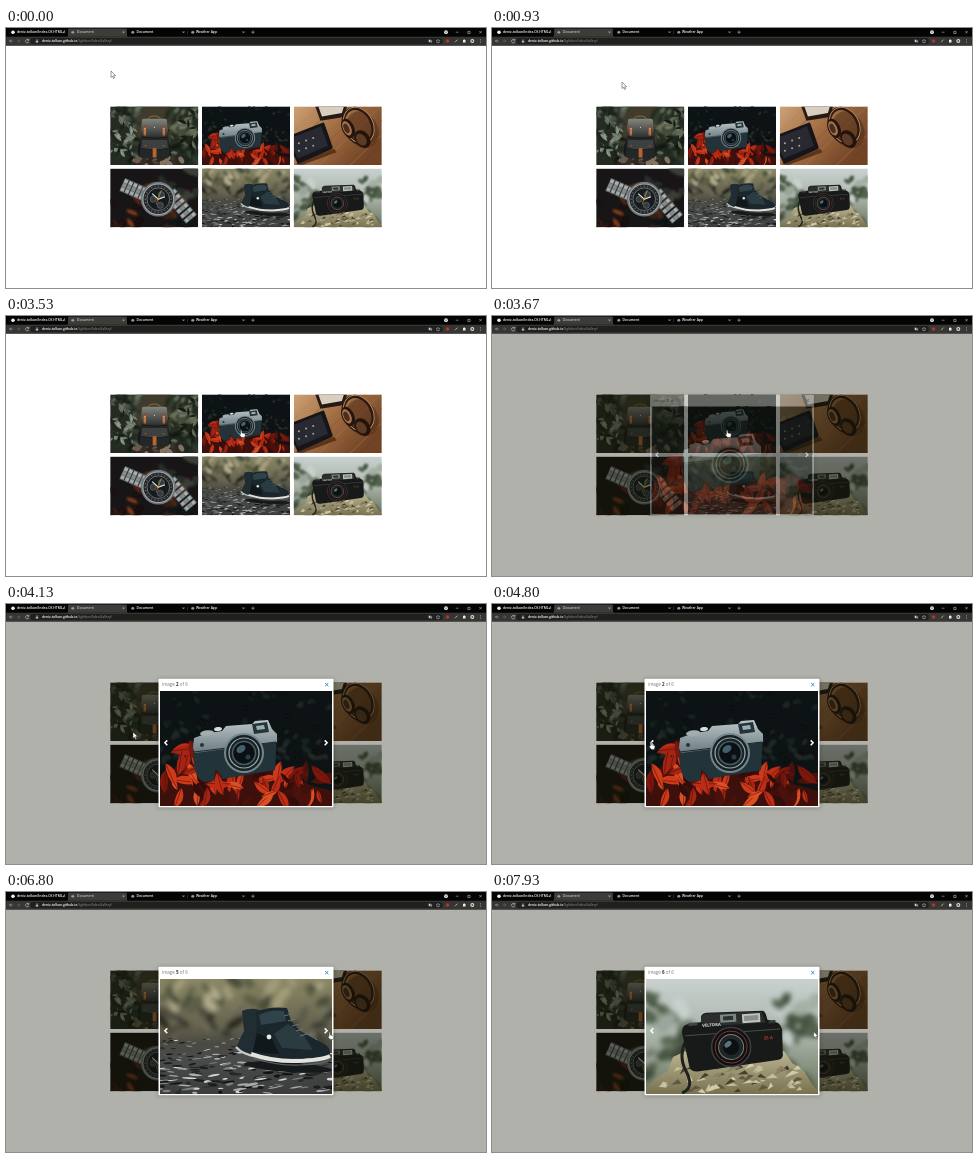
An HTML page that plays this animation: 480 px wide and 260 px high, repeating every 8 s.

```html
<!DOCTYPE html>
<html lang="en">
<head>
<meta charset="utf-8">
<title>Image gallery</title>
<style>
html, body { margin: 0; width: 100%; height: 100%; overflow: hidden; background: #fff; }
svg#stage { display: block; width: 100vw; height: 100vh; }
text { font-family: "Open Sans", Roboto, sans-serif; }
</style>
</head>
<body>
<svg id="stage" viewBox="0 0 480 260" xmlns="http://www.w3.org/2000/svg">
<defs>
  <filter id="soft" x="-20%" y="-20%" width="140%" height="140%"><feGaussianBlur stdDeviation="2.4"/></filter>
  <filter id="hazy" x="-20%" y="-20%" width="140%" height="140%"><feGaussianBlur stdDeviation="0.8"/></filter>
  <filter id="glow" x="-20%" y="-20%" width="140%" height="140%"><feGaussianBlur stdDeviation="2"/></filter>
  <linearGradient id="flap" x2="0" y2="1"><stop stop-color="#83857e"/><stop offset=".45" stop-color="#5b5d59"/><stop offset="1" stop-color="#2b2e2d"/></linearGradient>
  <linearGradient id="silver" x2="0" y2="1"><stop stop-color="#bcc7c9"/><stop offset="1" stop-color="#6b7b80"/></linearGradient>
  <linearGradient id="wood" x2="1" y2=".6"><stop stop-color="#cda277"/><stop offset=".45" stop-color="#a67146"/><stop offset="1" stop-color="#704325"/></linearGradient>
  <linearGradient id="bank" x2="0" y2="1"><stop stop-color="#8b8867"/><stop offset=".4" stop-color="#66644e"/><stop offset=".56" stop-color="#4a4a43"/><stop offset=".7" stop-color="#4a4c4b"/><stop offset="1" stop-color="#3b3d3d"/></linearGradient>
  <linearGradient id="sky" x2="0" y2="1"><stop stop-color="#c9d1d0"/><stop offset=".5" stop-color="#a9b3a8"/><stop offset="1" stop-color="#6a755e"/></linearGradient>
  <linearGradient id="log" x2="0" y2="1"><stop stop-color="#bdb693"/><stop offset="1" stop-color="#777150"/></linearGradient>
</defs>
<rect width="480" height="260" fill="#fff"/>
<g id="grid"></g>
<rect id="shade" y="17.5" width="480" height="243" fill="#1a1c08" opacity=".34"/>
<g id="box">
  <rect x="152" y="75" width="176" height="129" fill="#000" opacity=".25" filter="url(#glow)"/>
  <rect x="152.5" y="74.7" width="175" height="128.6" rx="1" fill="#fff"/>
  <text x="156" y="82.3" font-size="4.5" fill="#777">image <tspan id="count" font-weight="700" fill="#333">2</tspan> of 6</text>
  <path d="M319.2 79l3.2 3.2m0-3.2l-3.2 3.2" stroke="#2a86a4" stroke-width=".9"/>
  <use id="photo" x="154" y="87" width="172" height="115"/>
  <g fill="none" stroke="#fff" stroke-width="1.5">
    <path id="prev" d="M161.3 136.4l-2.4 2.4 2.4 2.4"/>
    <path id="next" d="M318.7 136.4l2.4 2.4-2.4 2.4"/>
  </g>
</g>
<g id="chrome"></g>
<g id="cursor" stroke="#222" stroke-width=".45" fill="#fff" stroke-linejoin="round">
  <path id="arrow" d="M0 0V6.4L1.5 5.1 2.5 7.4 3.6 6.9 2.6 4.7 4.6 4.6Z"/>
  <path id="hand" d="M.6 .3Q1.2 -.2 1.6 .5L2 3 4.7 3.6Q5.4 4 5.2 5L4.6 7.6H1.7L-.6 5.1Q-.6 4.1 .5 4.4Z"/>
</g>
</svg>
<script>
const $ = id => document.getElementById(id);
const W = 172, H = 115;

let seed = 7;
const rnd = (a = 1, b = 0) => {
  seed = (seed * 16807) % 2147483647;
  return b + (a - b) * seed / 2147483647;
};
const pick = list => list[Math.floor(rnd(list.length))];
const rect = (x, y, w, h, fill, more = '') => `<rect x="${x}" y="${y}" width="${w}" height="${h}" fill="${fill}" ${more}/>`;
const path = (d, fill, more = '') => `<path d="${d}" fill="${fill}" ${more}/>`;
const line = (d, stroke, width = 1) => `<path d="${d}" fill="none" stroke="${stroke}" stroke-width="${width}"/>`;
const disc = (x, y, r, fill, more = '') => `<circle cx="${x}" cy="${y}" r="${r}" fill="${fill}" ${more}/>`;
const oval = (x, y, rx, ry, fill, turn = 0, more = '') =>
  `<ellipse cx="${x}" cy="${y}" rx="${rx}" ry="${ry}" fill="${fill}" transform="rotate(${turn} ${x} ${y})" ${more}/>`;
const group = (filter, body) => `<g filter="url(#${filter})">${body}</g>`;

// scattered ovals inside a region
function scatter(n, [x0, y0, x1, y1], size, flat, colors) {
  let s = '';
  for (let i = 0; i < n; i++) {
    const r = rnd(size, size * .4);
    s += oval(rnd(x1, x0).toFixed(1), rnd(y1, y0).toFixed(1), r.toFixed(1), (r * flat).toFixed(1),
      pick(colors), Math.round(rnd(70, -70)));
  }
  return s;
}
// pointed leaves with a vein
function leaves(n, [x0, y0, x1, y1], size, colors, vein = '#4a0d06') {
  let s = '';
  for (let i = 0; i < n; i++) {
    const k = rnd(size, size * .5).toFixed(1), h = (k * .45).toFixed(1);
    s += `<g transform="translate(${rnd(x1, x0).toFixed(1)} ${rnd(y1, y0).toFixed(1)}) rotate(${Math.round(rnd(360))})">` +
      path(`M-${k} 0Q0 -${h * 2} ${k} 0Q0 ${h} -${k} 0Z`, pick(colors)) + line(`M-${k} 0H${k}`, vein, .5) + '</g>';
  }
  return s;
}

function backpack() {
  const dark = ['#1a211b', '#242d24', '#10160f', '#323d30'];
  let s = rect(0, 0, W, H, '#252b23');
  s += group('soft',
    rect(50, 0, 70, 70, '#3f3a2c') +
    scatter(40, [0, 0, 60, 115], 13, .4, [...dark, '#4d584a', '#66705f']) +
    scatter(32, [112, 0, 172, 115], 13, .4, [...dark, '#465039']) +
    scatter(12, [120, 5, 165, 50], 10, .4, ['#717762', '#5c654e', '#838873']));
  s += group('hazy',
    leaves(26, [2, 45, 48, 98], 11, ['#939b8b', '#7b8677', '#59675a', '#1a211b'], '#3a443a') +
    leaves(10, [0, 5, 35, 40], 11, ['#6d7868', '#4b574a', '#192019'], '#2c352c') +
    leaves(26, [118, 10, 170, 108], 11, ['#515d46', '#394433', '#151b15', '#68705a'], '#20291f'));
  s += rect(40, 104, 100, 11, '#2b2620');
  s += scatter(22, [50, 102, 145, 115], 9, .6, ['#6b594b', '#4e4037', '#352d27', '#857261']);
  s += line('M73 26Q75 19 86 19T99 26', '#8c774a', 1.8);
  s += path('M61 62L54 78 55 96 62 99ZM111 62L118 80 118 96 112 99Z', '#15191a');
  s += path('M61 40L62 26H111L113 42 116 96Q115 102 108 102H67Q58 101 58 96Z', '#232727');
  s += path('M60 46L62 27Q62 24 66 24H107Q111 24 111 27L113 46 111 59Q86 64 62 59Z', 'url(#flap)');
  s += path('M62 66H111L113 82Q87 88 61 82Z', '#3c403e') + line('M61 82Q87 88 113 82M62 60Q86 65 111 60', '#0f1211', 1.2);
  for (const x of [65.5, 102.5]) {
    s += rect(x, 38, 4.6, 20, '#8d4a28') + rect(x, 44, 4.6, 11, '#cc7340') + rect(x + .4, 42, 3.8, 2, '#cbb294');
  }
  s += disc(69, 77, 1.4, '#b75c2b') + disc(105, 77, 1.4, '#b75c2b') + rect(83, 82, 7.5, 18, '#bb6234');
  return s + disc(86.5, 41, 1.2, '#d5d6d0');
}

function redCamera() {
  const reds = ['#a52413', '#cf3a1b', '#dc4f25', '#7c170e', '#4a120d', '#2f0d0a', '#bc2c17'];
  let s = rect(0, 0, W, H, '#0d1314');
  s += group('hazy', scatter(90, [0, 0, 172, 80], 5, .5, ['#16211f', '#1d2826', '#0a0f11', '#272c26']));
  s += path('M0 95L18 72 28 50 40 60 48 84 110 76 150 94 172 100V115H0Z', '#3d100c');
  s += leaves(38, [5, 80, 165, 112], 14, reds) + leaves(10, [18, 53, 42, 85], 14, reds);
  s += path('M33 54L117 43 115 79 44 91Q36 88 34 75Z', '#22343a');
  s += path('M33 57L34 47 48 42 62 40 66 35 92 33 95 30 108 29 112 38 117 43V51L35 62Z', 'url(#silver)');
  s += path('M92 33L107 31 109 41 94 43Z', '#26343a') + path('M96 35L104 34 105 38 97 39Z', '#95afb3');
  s += oval(47, 42, 7, 2.7, '#a1aeb0', -8) + oval(58, 38, 4, 2, '#d7dddd', -8) + disc(42, 54, 2, '#263338');
  s += line('M34 61L116 51', '#1a272b', 1);
  s += disc(84, 62, 20, '#75868b') + disc(84, 62, 18, '#172226') + disc(84, 62, 15, 'none', 'stroke="#9ba9aa" stroke-width="1.2"');
  s += disc(84, 62, 11.5, '#0a1013', 'stroke="#4a5c61" stroke-width="1.5"') + oval(81, 58, 5, 3.5, '#426068', -35) + disc(88, 66, 2.5, '#263d45');
  return s + leaves(14, [20, 88, 125, 113], 13, reds) + leaves(5, [118, 77, 142, 92], 10, reds);
}

function headphones() {
  let s = rect(0, 0, W, H, 'url(#wood)');
  for (let i = 0; i < 8; i++) s += line(`M${i * 30 - 70} 115L${i * 30 + 50} 0`, i % 2 ? '#7d4f2c' : '#b27e50', 1);
  s += path('M42 0H104L98 21 52 28Z', '#261a14') + path('M48 0H98L94 13 55 20Z', '#d8cfc0');
  s += path('M3 113L79 83 84 90 16 115Z', '#5c3518');
  s += path('M0 54L56 32Q59 31 60 34L76 80Q76 83 74 84L8 113 0 96Z', '#15151a') + path('M0 60L53 39 67 77 8 102 0 86Z', '#292a31');
  for (let i = 0; i < 6; i++) s += disc(10 + i % 3 * 14, 72 - i % 3 * 5 + (i > 2 ? 15 : 0), 2, '#a5a29c');
  s += oval(134, 46, 30, 38, '#4a2915', -28, 'opacity=".5"');
  s += oval(126, 38, 27, 36, 'none', -28, 'stroke="#2c1910" stroke-width="7"');
  s += oval(127, 37, 28, 37, 'none', -28, 'stroke="#b58a63" stroke-width="2"');
  s += oval(106, 43, 12, 20, '#24140d', -24) + oval(104, 43, 8, 15, '#a2754f', -24) + oval(103, 43, 5, 10, '#4c2c1b', -24);
  return s + oval(134, 64, 14, 19, '#22130c', -38) + oval(132, 65, 9, 13, '#5d3a24', -38);
}

function watch() {
  let s = rect(0, 0, W, H, '#171516');
  s += group('soft', scatter(14, [0, 55, 60, 115], 16, .3, ['#5a2516', '#86401f', '#1f100d', '#3a1a13', '#120d0c']) +
    scatter(16, [60, 0, 172, 60], 22, .4, ['#292d2c', '#3b3d38', '#171819', '#553a28']) +
    scatter(9, [110, 60, 172, 115], 18, .4, ['#111214', '#302019', '#51281a']));
  const links = (x, y, dx, dy, turn) => {
    let r = '';
    for (let i = 0; i < 6; i++) {
      r += `<g transform="translate(${x + dx * i} ${y + dy * i}) rotate(${turn})">` +
        rect(-5, -14, 9, 28, '#5c6163') + rect(-4, -12, 7, 7, '#a9afaf') + rect(-4, -4, 7, 8, '#858c8e') + rect(-4, 5, 7, 7, '#a1a7a6') + '</g>';
    }
    return r;
  };
  s += links(28, 33, 9, 4, 24) + links(119, 51, 7.5, 9, 50);
  s += disc(94, 60, 34, '#6f7679') + disc(94, 60, 31, '#a3a9a9') + disc(94, 60, 29, '#25292c') + disc(94, 60, 22, '#161b1e', 'stroke="#aaaead" stroke-width="1"');
  for (let i = 0; i < 24; i++) {
    const a = i * Math.PI / 12, c = Math.cos(a), n = Math.sin(a);
    s += line(`M${94 + 24 * c} ${60 + 24 * n}L${94 + 27 * c} ${60 + 27 * n}`, '#c9cbc7', .8);
  }
  for (const [x, y] of [[84, 60], [100, 51], [98, 72]]) s += disc(x, y, 6, '#343b3f', 'stroke="#8d9394" stroke-width=".8"');
  return s + line('M94 60L82 49M94 60L107 55', '#ecebe5', 2) + line('M90 70L100 42', '#e1a62d', 1.2) + disc(94, 60, 1.8, '#d8aa44');
}

function shoes() {
  let s = rect(0, 0, W, H, 'url(#bank)');
  s += group('soft', scatter(40, [0, 0, 172, 32], 12, .5, ['#a19c78', '#7f7f5c', '#5c5f46', '#b0ab8b', '#494d3a']) +
    scatter(18, [0, 34, 80, 56], 13, .35, ['#37352c', '#504c3f', '#25261f', '#6b6757']) +
    scatter(10, [125, 30, 172, 60], 11, .4, ['#5b5c4c', '#3b3e35', '#787866']));
  for (let i = 0; i < 230; i++) {
    const y = rnd(114, 58), near = (y - 40) / 70;
    s += oval(rnd(172).toFixed(1), y.toFixed(1), rnd(9 * near, 2).toFixed(1), rnd(1.7 * near, .4).toFixed(1),
      pick(['#a9acac', '#1b1d1d', '#7c8080', '#d3d6d5', '#262929', '#111313']), Math.round(rnd(8, -14)));
  }
  s += oval(128, 88, 44, 5, '#171a1b', 4);
  s += path('M82 32Q90 28 100 31L110 50 110 72 92 77Q80 74 76 68Q80 60 84 52Z', '#202d33') + line('M76 68Q83 76 96 77', '#c7cac6', 2.4);
  s += path('M96 33Q108 27 127 29L131 42 140 52Q153 59 166 66Q172 71 169 78L126 80 91 75Q99 58 96 33Z', '#1a272d');
  s += path('M99 36Q111 30 124 32L126 42 101 46Z', '#30424a') + path('M128 45L143 55 153 71 122 69 114 55Z', '#2a3b42') + path('M97 54L112 60 119 75 93 73Z', '#12171a');
  s += line('M91 75Q114 83 138 82T170 77', '#e2e3dd', 4) + line('M93 79Q117 87 140 86T169 81', '#5f6667', 1.2);
  for (let i = 0; i < 5; i++) s += line(`M${124 + i * 4} ${37 + i * 5}l7 -2`, '#63757b', 1);
  return s + disc(109, 58, 2.4, '#e7e9e5');
}

function filmCamera() {
  let s = rect(0, 0, W, H, 'url(#sky)');
  s += group('soft', scatter(22, [0, 12, 42, 90], 12, .6, ['#6f7d6a', '#9aa69b', '#56654f', '#c7d0cc', '#465541']) +
    scatter(26, [128, 18, 172, 75], 11, .6, ['#77856f', '#a5b0a5', '#53634d', '#44533f', '#c3cbc6']) +
    scatter(24, [0, 72, 172, 115], 15, .5, ['#5a644c', '#717a5b', '#3d4938']));
  s += path('M0 110L10 99 22 92 27 78 40 72 52 85 70 90 100 86 128 74 138 72 146 84 158 92 166 105 172 112V115H0Z', 'url(#log)');
  for (let i = 0; i < 60; i++) {
    const x = rnd(150, 12), y = rnd(114, 90);
    s += path(`M${x.toFixed(1)} ${y.toFixed(1)}l${rnd(8, 3).toFixed(1)} ${rnd(-3, -8).toFixed(1)} ${rnd(7, 2).toFixed(1)} ${rnd(5, 1).toFixed(1)}Z`,
      pick(['#463f2e', '#d2cba9', '#8a8260', '#5f573f', '#c5be9c']));
  }
  s += line('M42 58Q31 75 40 92T36 114', '#1f211e', 3);
  let c = path('M37 50Q37 43 44 42L57 41V36Q58 32 63 32L119 34Q122 35 123 43L133 47Q136 49 137 54L136 80Q135 84 130 84L50 90Q43 90 42 85Z', '#181a1a');
  c += path('M57 37Q58 33 63 33L118 35 121 46 57 46Z', '#2b2e2d') + rect(76, 35, 16, 8, '#7e8782') + rect(79, 37, 10, 4, '#2c3333') + rect(98, 36, 18, 9, '#bfc4bb') + rect(100, 38, 14, 5, '#878f8a');
  c += `<text x="57.5" y="46" font-size="4.2" font-weight="700" fill="#d5d8d2">VELTORA</text>`;
  c += rect(40, 53, 95, 1, '#454b48') + rect(44, 41, 9, 3, '#424744') + rect(124, 44, 7, 3, '#343837');
  c += disc(85, 68, 19.5, '#0e1011', 'stroke="#3a3e3c" stroke-width="1.5"') + disc(85, 68, 16, 'none', 'stroke="#8c3a30" stroke-width=".9"');
  c += disc(85, 68, 12.5, '#202525', 'stroke="#767c78" stroke-width="1"') + disc(85, 68, 8, '#0b1013') + oval(82, 65, 4, 2.6, '#58717a', -35);
  c += `<text x="118" y="63" font-size="4.5" font-weight="700" fill="#a53c30">35 A</text>`;
  return s + `<g transform="rotate(-4 86 66)">${c}</g>`;
}

const defs = document.querySelector('defs');
const photos = [backpack, redCamera, headphones, watch, shoes, filmCamera];
defs.innerHTML += photos.map((draw, i) =>
  `<symbol id="p${i + 1}" viewBox="0 0 ${W} ${H}" preserveAspectRatio="none">${draw()}</symbol>`).join('');
$('grid').innerHTML = photos.map((_, i) =>
  `<use href="#p${i + 1}" x="${104.2 + i % 3 * 91.8}" y="${i < 3 ? 78.4 : 140.6}" width="88" height="58.7"/>`).join('');

function chrome() {
  const label = (x, y, t, fill = '#fff') => `<text x="${x}" y="${y}" font-size="3.35" font-weight="600" fill="${fill}">${t}</text>`;
  const cross = (x, y, r = .9) => line(`M${x - r} ${y - r}l${2 * r} ${2 * r}m0 ${-2 * r}l${-2 * r} ${2 * r}`, '#dcdcdc', .5);
  let s = rect(0, 0, 480, 17.6, '#040404') + rect(0, 8.7, 480, 8.9, '#363633') + rect(0, 17.2, 480, .5, '#6b5e68');
  s += path('M61 8.8Q62 8.5 62 7V1.8Q62 .6 63.5 .6H119.5Q121 .6 121 2V7Q121 8.5 122 8.8Z', '#3c3c39');
  s += rect(24, 10, 413, 6.2, '#20201f', 'rx="3.1"');
  s += disc(7, 4.2, 1.8, '#f1f1f1') + label(11, 5.4, 'deniz-tolkan/Index-Of-HTML-/');
  for (const x of [65.8, 125.8, 185.8]) s += disc(x + 1, 4.2, 1.5, '#777b80') + line(`M${x - .3} 4.2h2.6`, '#d7d9dc', .5);
  s += label(71, 5.4, 'Document', '#c9c9c5') + label(130.5, 5.4, 'Document') + label(190, 5.4, 'Weather App');
  for (const x of [58, 117.5, 177.5, 237.5]) s += cross(x, 4.2);
  s += line('M181.5 2.5V6.7', '#56585c', .4) + line('M247 2.5V5.9M245.3 4.2H248.7', '#d9dbde', .5);
  s += disc(440, 4.2, 1.9, '#eee') + path('M439.1 3.7H440.9L440 4.9Z', '#222');
  s += line('M449.8 4.2H452.5', '#ddd', .5) + line('M461.8 3.3H464V5.5H461.8Z', '#ddd', .5) + cross(474.5, 4.2, 1.2);
  s += line('M6.8 13H3.5M5 11.5L3.5 13 5 14.5', '#c6c8cb', .5) + line('M10.7 13H14M12.5 11.5L14 13 12.5 14.5', '#73767a', .5);
  s += line('M22.5 12A1.7 1.7 0 1 0 22.9 13.5M22.8 11V12.3H21.5', '#e0e2e4', .55);
  s += rect(29.8, 12.7, 2.4, 1.9, '#b9bcc0') + line('M30.3 12.7V11.8Q31 10.8 31.7 11.8V12.7', '#b9bcc0', .4);
  s += label(36, 14.2, 'deniz-tolkan.github.io<tspan font-weight="400" fill="#8f9090">/lightboxVideoGallery/</tspan>');
  s += rect(422.7, 11.7, 1.8, 2.4, '#cfd2d5') + rect(424.3, 12.2, 1.8, 2.4, '#85898e');
  s += line('M432 11.2l.6 1.3 1.3.2-1 .9.3 1.4-1.2-.7-1.2.7.3-1.4-1-.9 1.3-.2Z', '#cfd2d5', .4);
  s += disc(441.5, 13, 1.8, '#b8322c') + line('M449 14.2L451.5 11.7', '#c6cccc', .8) + rect(457, 12, 2.5, 2.5, '#eee') + disc(458.2, 11.8, .6, '#eee');
  s += disc(466.3, 13, 2, '#e0e0de') + disc(466.3, 13, 1, '#55585b');
  for (const y of [11.6, 13, 14.4]) s += disc(474.5, y, .4, '#dfe1e3');
  return s;
}
$('chrome').innerHTML = chrome();

const LOOP = 8000, OPEN = 3630;
// time, x, y of the pointer
const moves = [
  [0, 105, 43], [70, 105, 43], [600, 130, 54], [930, 130, 54], [1000, 185, 170], [1060, 236, 246],
  [1130, 240, 234], [1330, 240, 234], [1930, 155, 113], [2070, 155, 113], [2870, 210, 112],
  [2930, 210, 112], [3500, 234, 114], [3720, 234, 114], [4100, 127, 128], [4200, 127, 128],
  [4470, 150, 137], [4670, 150, 137], [4850, 159.5, 138], [5100, 159.5, 138], [5720, 323.5, 140],
  [6900, 322.5, 140], [8000, 321.5, 139.5]
];
// time, number of the photo shown from then on
const steps = [[0, 2], [5000, 1], [5930, 2], [6070, 3], [6330, 4], [6800, 5], [7270, 6]];

const clamp = v => Math.min(1, Math.max(0, v));
const smooth = v => v * v * (3 - 2 * v);

function pointer(t) {
  const i = Math.max(1, moves.findIndex(m => m[0] > t));
  const [a, x, y] = moves[i - 1], [b, u, v] = moves[i];
  const k = smooth(clamp((t - a) / (b - a)));
  return [x + (u - x) * k, y + (v - y) * k];
}
function overPhoto(x, y) {
  return x > 104 && x < 376 && (x - 104.2) % 91.8 < 88 && (y > 78.4 && y < 137 || y > 140.6 && y < 199);
}
const show = (id, on) => $(id).setAttribute('visibility', on ? 'visible' : 'hidden');

let shown = 0;
function render(t) {
  const open = t >= OPEN;
  const n = steps.filter(s => s[0] <= t).pop()[1];
  if (n !== shown) {
    shown = n;
    $('photo').setAttribute('href', '#p' + n);
    $('count').textContent = n;
  }
  show('shade', open);
  show('box', open);
  $('grid').style.filter = open ? 'brightness(.75)' : 'none';
  const k = 1 - (1 - clamp((t - OPEN) / 300)) ** 3, z = .9 + .1 * k;
  $('box').setAttribute('opacity', k);
  $('box').setAttribute('transform', `translate(240 139) scale(${z}) translate(-240 -139)`);
  $('prev').setAttribute('opacity', n > 1 ? 1 : 0);
  $('next').setAttribute('opacity', n < 6 ? 1 : 0);

  const [x, y] = pointer(t);
  const onPrev = n > 1 && x > 154 && x < 166, onNext = n < 6 && x > 314 && x < 326;
  const hand = open ? onPrev || onNext || t < 3720 : overPhoto(x, y);
  $('cursor').setAttribute('transform', `translate(${x} ${y})`);
  show('hand', hand);
  show('arrow', !hand);
}

const start = performance.now();
function tick() {
  render((performance.now() - start) % LOOP);
  requestAnimationFrame(tick);
}
tick();
</script>
</body>
</html>
```
